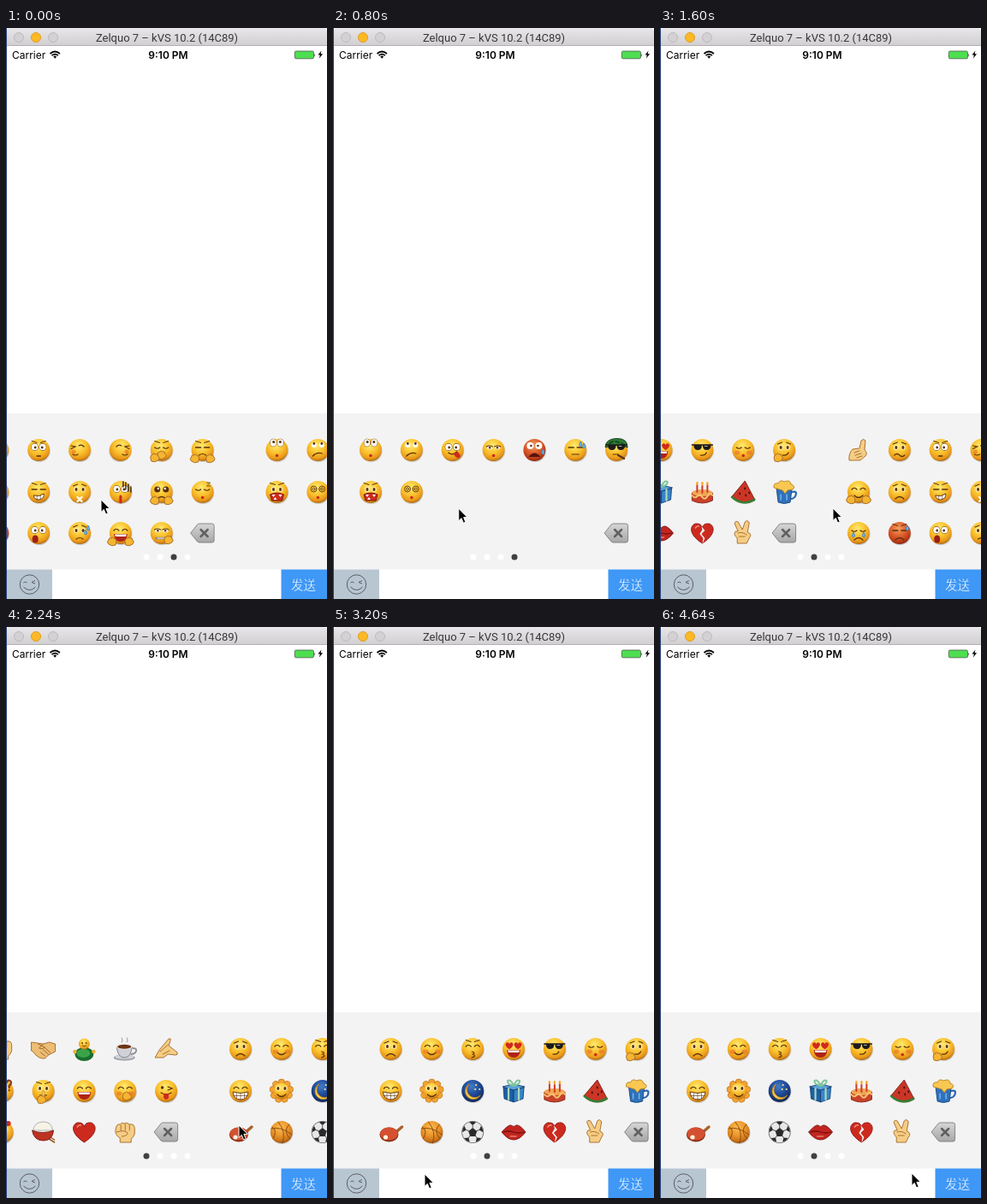
These frames come from a looping animation (375 by 667 pixels, 4720 ms). An HTML page:

```html
<!DOCTYPE html>
<html lang="zh">
<meta charset="utf-8">
<title>Emoji keyboard</title>
<style>
  html, body { margin: 0; width: 100%; height: 100%; overflow: hidden; background: #fff; }
  svg { display: block; width: 375px; height: 667px; }
  text { font-family: Inter, Roboto, sans-serif; font-size: 12px; }
</style>
<svg viewBox="0 0 375 667">
  <defs>
    <linearGradient id="chrome" x2="0" y2="1"><stop stop-color="#e8e6e8"/><stop offset="1" stop-color="#d0ced0"/></linearGradient>
    <linearGradient id="key" x2="0" y2="1"><stop stop-color="#d6d6d6"/><stop offset="1" stop-color="#a6a6a6"/></linearGradient>
    <clipPath id="panel"><path d="M1 450h374v182H1z"/></clipPath>
  </defs>
  <path d="M0 0h375v667H0z" fill="#fff"/>
  <path d="M0 0h1v667H0z" fill="#25417f"/>
  <path d="M1 21V4q0-4 4-4h366q4 0 4 4v17z" fill="url(#chrome)"/>
  <path d="M1 20.5h374" stroke="#b3b1b3"/>
  <g stroke="#bcbabc" fill="#d3d1d3">
    <circle cx="15" cy="11" r="5.5"/><circle cx="55" cy="11" r="5.5"/>
    <circle cx="35" cy="11" r="5.5" fill="#fdb924" stroke="#df9d1d"/>
  </g>
  <text x="188" y="15.5" text-anchor="middle" fill="#383838" style="font:13px Roboto,sans-serif">Zelquo 7 – kVS 10.2 (14C89)</text>
  <text x="7" y="35.5">Carrier</text>
  <g fill="none" stroke="#000" stroke-width="1.7">
    <path d="M51.5 30q5.7-5 11.4 0M53.5 32.2q3.7-3.2 7.4 0"/>
    <path d="M55.2 33.3q2-1.6 4 0l-2 2.4z" fill="#000" stroke="none"/>
  </g>
  <text x="189.5" y="35.5" text-anchor="middle" font-weight="600">9:10 PM</text>
  <rect x="337.3" y="27" width="22.2" height="8.8" rx="1.6" fill="#4ede51" stroke="#4a5a4a" stroke-width=".8"/>
  <path d="M360.5 30q1.5 1.7 0 3.5zM368.5 26.5l-4 5h2.4l-1 4 4.2-5.2h-2.5z"/>
  <path d="M1 450h374v182.5H1z" fill="#f3f3f3"/>
  <g clip-path="url(#panel)"><g id="strip"></g></g>
  <g id="dots"></g>
  <path d="M1 632.5h53v34.5H1z" fill="#b8c6d2"/>
  <g fill="none" stroke="#55585c" stroke-width=".95">
    <circle cx="27.5" cy="650" r="11.2"/>
    <path d="M20.5 648q2-2 4 0M34 645.5l-4 2 4 1.6M20.5 653q7 7 14 0"/>
  </g>
  <path d="M321.5 632.5h53.5v34.5h-53.5z" fill="#3f98f6"/>
  <text x="347.5" y="656.3" text-anchor="middle" fill="#fff" stroke="#3f98f6" stroke-width=".35" style="font:300 14.5px 'Noto Sans CJK SC','Noto Sans CJK',sans-serif">发送</text>
  <path id="cursor" d="M0 0V14.5L3.3 11.4L5.6 17L8.2 15.9L5.9 10.4H10.3Z" stroke="#fff" stroke-width="1"/>
</svg>
<script>
const LOOP = 4720, STEP = 80, PAGE = 374;
const ink = '#5a300a', white = '#fff', red = '#cf2a1c', skin = '#f6cd84', edge = '#a1672a', blue = '#6fb4e6';
const $ = id => document.getElementById(id);

// drawing helpers, centred on 0,0
const line = (d, w = 1.2, c = ink) => `<path d="${d}" fill="none" stroke="${c}" stroke-width="${w}" stroke-linecap="round"/>`;
const shape = (d, c, s = 'none') => `<path d="${d}" fill="${c}" stroke="${s}" stroke-width=".9" stroke-linejoin="round"/>`;
const dot = (x, y, r, c = ink, ry = r) => `<ellipse cx="${x}" cy="${y}" rx="${r}" ry="${ry}" fill="${c}"/>`;
const both = s => s + `<g transform="scale(-1 1)">${s}</g>`;
const place = (x, y, s, extra = '') => `<g transform="translate(${x} ${y}) ${extra}">${s}</g>`;
const spin = (n, s) => Array.from({ length: n }, (_, i) => `<g transform="rotate(${i * 360 / n})">${s}</g>`).join('');

const shade = (id, ...colors) => document.querySelector('defs').insertAdjacentHTML('beforeend',
  `<radialGradient id="${id}" cx=".45" cy=".3" r=".72">${colors.map((c, i) =>
    `<stop offset="${[.05, .5, .82, 1][i]}" stop-color="${c}"/>`).join('')}</radialGradient>`);
shade('yellow', '#ffe66a', '#f9c02c', '#e7961a', '#a8640e');
shade('angry', '#f09a5a', '#dc5c2b', '#b83a18', '#842510');
shade('orange', '#fbb84e', '#ea962b', '#cc7318', '#8e4d0c');
shade('night', '#3f78c4', '#204a98', '#15346e', '#0d2450');

const ball = (id, r = 13) => dot(.7, 1.2, r, '#0002') + dot(0, 0, r, `url(#${id})`);
const face = (...parts) => ball('yellow') + parts.join('');
const rage = (...parts) => ball('angry') + parts.join('');

const eyes = {
  dots: both(dot(4.2, -3, 2.6, '#fff9', 3) + dot(4, -3, 1.5, ink, 1.9)),
  happy: both(line('M2-3q3-3.5 6 0')),
  shut: both(line('M2-3q3 2.5 6 0')),
  flat: both(line('M2-3h6', 1.5)),
  wide: both(dot(4.7, -3.5, 4.4, '#8a5212') + dot(4.7, -3.5, 3.8, white) + dot(4, -3, 1.4)),
  up: both(dot(4.2, -8.5, 4.1, '#8a5212', 4.8) + dot(4.2, -8.5, 3.5, white, 4.2) + dot(3.8, -9.6, 1.5)),
  half: both(dot(4.6, -3, 3.2, white, 2) + dot(4.4, -2.7, 1.3) + line('M1.2-4q3.5-2 7 0')),
  dizzy: both(line('M4.8-3.5m-3.5 0a3.5 3.5 0 1 0 7 0a3.5 3.5 0 1 0-7 0M3.3-3.5a1.5 1.5 0 1 0 3 0a1.5 1.5 0 1 0-3 0', .9)),
  tilted: line('M-10-5l5 1-5 2.5M-1-5q3-2 6 1'),
};
const smile = line('M-5 4q5 5 10 0'), frown = line('M-5 8q5-5 10 0');
const smirk = line('M-2 6q5 1 7-3'), pout = dot(0, 6.5, 1.8, red);
const laugh = shape('M-8 1h16q-1 9-8 9t-8-9z', '#b02318') + shape('M-7 1.4h14l-1 2.6h-12z', white);
const teeth = shape('M-9 1q9 3 18 0q-1 9-9 9t-9-9z', white, ink) + line('M-4.5 3v5.5M0 3v7M4.5 3v5.5M-8 5.5h16', .6);
const grin = shape('M-6 4q7 2 12-2q1 6-6 7-5 0-6-5z', white, ink) + line('M-2 5v4M2 4v4', .6);
const gasp = dot(0, 6, 3, '#9c1d16', 4);
const brows = both(line('M2-8.5l6-2', 1)), worry = both(line('M2.5-9l5 2', 1.1));
const cheeks = both(dot(7, 3, 3.2, '#e8642b88', 2.4));
const tear = (x, y) => shape(`M${x} ${y}q-3 5 0 6q3-1 0-6z`, blue, '#3f86c4');
const paw = (x, y) => place(x, y, shape('M-5 0q0-4 3-4q1-2 3 0q3-1 3 2q3 2 0 5q-4 3-8 1z', '#f5b531', edge));
const shades = both(shape('M.5-6h9.5q0 6-4.8 6T.5-6z', '#1b1b1b')) + line('M-12-6h24', 1.5, '#1b1b1b') + line('M3-4.5l3 0', 1, '#aaa');
const sulk = face(eyes.tilted, dot(-7, 2, 2.5, '#e8642b88'), line('M-8 5q3 2 6 0'));

// objects
const heartPath = 'M0 12C-20-1-12-12-6-11Q-1-11 0-6Q1-11 6-11C12-12 20-1 0 12z';
const heart = shape(heartPath, '#cd2a1f', '#8a1712') + line('M-8-6q2-3 4-2', 1.6, '#f0907f');
const broken = heart + shape('M-1-8l4 5-4 4 4 5-3 7 1-7-4-5 3-5z', '#f3f3f3');
const fist = shape('M-11-4q1-6 5-5q2-3 5-1q3-2 6 1q6-1 6 5v6q-2 5-4 6v4h-13v-5q-7-4-5-11z', skin, edge)
  + line('M-5-8v6M0-9v7M5-8v6M-10 0q9-3 13 1q-1 4-7 4', .9, edge);
const victory = shape('M-7 12v-6q-5-5-2-8l3 0-4-9q0-4 4-2l5 9 3-9q3-3 5 1l-2 11q6 2 2 7l-3 6z', skin, edge) + line('M-6 0q5-2 10 2M-5 4h7', .9, edge);
const point = shape('M-11 12q-1-8 4-13l8-1 2-9q3-3 5 0l-1 11q4 3 1 7l-6 5z', skin, edge) + line('M-5 3l6-2M-4 6l7-2M-2 9l6-2', .9, edge);
const clap = shape('M-13 10l5-9 11-13q3-1 2 2l-2 6 10 8q1 3-2 3l-9-1-5 4z', skin, edge) + line('M-7 3l9-8M-4 6l8-4', .9, edge);
const shake = shape('M-14-8l7 1 7 1 7-2 7 2v9l-8 4-4 4q-8 1-14-8l-2-1z', '#ecbe74', edge)
  + line('M-6-6l6 3 8 7M-3 4l5 4M0 1l6 5M0-6l-5 5q4 2 7-1', 1, edge);
const baby = dot(0, 6, 11, '#1a6e2e', 8) + dot(-1, 5, 8, '#3aa348', 5) + dot(0, -6, 6.5, 'url(#yellow)')
  + both(dot(2.3, -7, .9)) + line('M-2-4q2 2 4 0', .9) + both(dot(11, 3, 2.2, '#f2b232'));
const coffee = dot(-1, 10, 12.5, '#9da0a6', 3.5) + dot(-1, 9.2, 11, '#d0d2d6', 2.6) + shape('M-10-3q1 13 9 13t9-13z', '#cfd1d6', '#777a80')
  + line('M9-1q6 0 3 5q-2 2-5 2', 1.8, '#8d8f94') + dot(-1, -3, 9.5, '#eee', 3.4) + dot(-1, -2.7, 8, '#6d3514', 2.5) + line('M-4-8q2-2 0-5M2-8q2-2 0-5', 1, '#999');
const rice = line('M2 5l11 7M4 3l9 6', 1.5, '#9a5724') + shape('M-12-2q2-10 12-10t11 10z', '#f6f2e6', '#aaa')
  + shape('M-13-2q12 5 25 0q-1 12-12 12t-13-12z', '#bd3322', '#7c1c13');
const sun = spin(9, dot(0, -10, 4, '#c87a1c', 4.2) + dot(0, -10, 3.2, '#f0a334', 3.6)) + dot(0, 0, 9.5, 'url(#yellow)') + eyes.dots + smile;
const moon = ball('night') + shape('M-4-8A9.5 9.5 0 1 0 9 5A9 9 0 0 1-4-8z', '#f7cb4c', '#b9801c') + [[4, -7], [8, -2], [3, -2]].map(([x, y]) => dot(x, y, 1.1, '#ffe98a')).join('');
const gift = shape('M-12-4L0-1V13L-11 9z', '#1c5fa8', '#153f75') + shape('M0-1L12-4L11 9L0 13z', '#3784c8', '#153f75')
  + shape('M-13-5L0-8L13-5L0-1z', '#5aa2dc', '#153f75') + line('M-6-3V10M6-3V10', 2.2, '#a9d9b8')
  + both(line('M0-6q3-8 7-6q1 4-7 6', 2, '#7fc59a'));
const cake = shape('M-12 1v9q12 6 24 0V1z', '#c9412a', '#83240f') + dot(0, 1, 12, '#f0a652', 4) + line('M-12 4q3 4 6 1t6 1 6-1 6-1', 2, '#f8c474')
  + line('M-6 0v-8M0 1v-8M6 0v-8', 2, '#d03a2b') + [-6, 0, 6].map(x => dot(x, -10, 1.3, '#f9a51f', 2)).join('');
const melon = shape('M2-13L-13 5q12 12 26 3z', '#cb3526', '#7c1c13') + line('M-13 6q12 11 26 3', 2.8, '#3b7c35')
  + [[-4, 2], [2, -4], [3, 4], [7, 1]].map(([x, y]) => dot(x, y, .9, '#35120c', 1.4)).join('');
const beer = line('M9 0q7-2 4 5q-2 3-5 3', 2.2, '#2b67b4') + shape('M-9-4h18l-2 16q-7 3-14 0z', '#2f72bc', '#194780')
  + shape('M-12-5q-1-6 5-5q2-5 7-2q7-3 8 3q6 2 2 6l-6 1-3 4-3-4z', '#f8c852', '#b9821f') + line('M-4 3v6M3 3v6', 1.4, '#7db9ee');
const paddle = line('M5 1L13-6', 3.5, '#a7622c') + dot(-2, 3, 11, '#8c2e14', 8.5) + dot(-2, 2, 10.5, '#d45030', 7.5) + dot(-6, 6, 2.6, '#fff4dc');
const basket = ball('orange') + line('M-12-4Q0-7 12 3M-4-12Q6 0 1 13M-10 8Q-4-2-11-6M9-9Q1-1 10 8', .9, '#84450f');
const soccer = dot(0, 0, 13, '#666') + dot(0, 0, 12.2, '#e8e8e8') + shape('M0-5L5-1L3 5H-3L-5-1z', '#2a2a2a')
  + spin(5, shape('M-4-11.5q4-1.5 8 0L0-8z', '#2a2a2a') + line('M0-5v-3', 1, '#555'));
const lips = shape('M-14 0Q-6-9-3-8Q0-5 3-8Q7-9 14 0Q7 9 0 9T-14 0z', '#c2251f', '#7c1512') + line('M-12 0q6-2 12 0t12 0', 1.3, '#701010') + line('M-4 5h7', 1.4, '#e87a70');
const del = shape('M-14 0L-6-10Q-5-11-3-11H11q2.5 0 2.5 2.5V8.5q0 2.5-2.5 2.5H-3Q-5 11-6 10z', 'url(#key)', '#7d7d7d') + line('M-2-4l8 8M6-4l-8 8', 2.5, '#606060');
const helmet = shape('M-13-3Q-13-13 0-13.5T13-3Q0-8-13-3z', '#2f7a35', '#143f1a') + line('M-8-8l4-2M-1-10l4 1M6-8l3 2', 2, '#164b1e');
const question = place(8, -6, line('M-3-4q2-4 5-1q1 3-2 5v2M0 5v.3', 2.3, '#8d3a12'));

const pages = [
  [[face(eyes.happy, smile), fist, fist, shake, baby, coffee, clap],
   [face(eyes.dots, smile), face(eyes.wide, frown), face(eyes.dots, frown, question),
    face(eyes.dots, brows, line('M-4 5h8'), line('M0 1v10', 3.2, edge), line('M0 1v10', 2.2, '#fbd45c'), paw(-2, 10)),
    face(eyes.happy, laugh), face(eyes.happy, paw(2, 6), cheeks),
    face(dot(-4.5, -4, 1.7), line('M2-5l5 2-5 2'), line('M-6 2q6 4 12 0'), shape('M-3 3h6v5q-3 4-6 0z', red))],
   [heart, face(eyes.happy, cheeks, smile), face(eyes.dots, gasp, both(dot(7, -10, 3, red))), rice, heart, fist, del]],
  [[face(eyes.dots, worry, frown), face(eyes.happy, smile, cheeks), face(eyes.happy, brows, line('M-1 3q5 1 1 3q5 2-1 4')),
    face(both(place(5, -4, shape(heartPath, red), 'scale(.35)')), laugh), face(shades, smirk),
    face(eyes.shut, cheeks, pout), face(eyes.dots, worry, smirk, paw(-7, 9))],
   [face(eyes.happy, teeth), sun, moon, gift, cake, melon, beer],
   [paddle, basket, soccer, lips, broken, victory, del]],
  [[point, face(eyes.dots, worry, line('M-6 6q3-3 6 0t6 0')), face(eyes.wide, brows, line('M-2 7h4', 1.6)),
    sulk, place(0, 0, sulk, 'scale(-1 1)'),
    face(eyes.shut, brows, paw(0, 6), paw(-8, 9)), face(eyes.flat, brows, line('M-4 6q4-3 8 0'), both(paw(9, 10)))],
   [face(eyes.happy, smile, both(paw(9, 9))), face(eyes.dots, worry, frown), face(eyes.flat, brows, grin),
    face(eyes.dots, worry, line('M-2.5 6l5 5M2.5 6l-5 5', 2.3, white)),
    face(eyes.wide, line('M3-12v6M6-11v8M9-9v8M12-6v6', 1.5, '#3c3020'), line('M0 5v7', 3, red)),
    face(both(dot(5, -3, 3.5) + dot(4, -4, 1.2, white)), frown, both(paw(8, 10))),
    face(eyes.shut, pout, line('M5-11h4l-4 4h4', 1, '#7a5a1c'))],
   [face(eyes.shut, frown, both(tear(6, -1))), rage(eyes.flat, brows, frown, tear(9, -9)),
    face(eyes.wide, dot(-4, 7, 3.5, '#9c1d16', 4.5)), face(eyes.dots, worry, line('M-4 7q4-3 8 0'), tear(10, -9), tear(7, -4)),
    face(eyes.happy, laugh, both(paw(10, 10))), face(eyes.half, line('M-6 6h11', 2.4, '#777'), line('M-5 6h9', 1, white), paw(8, 8)), del]],
  [[face(eyes.up, pout), face(both(dot(4.5, -6, 3, white) + dot(4.5, -7.5, 1.4)), line('M-6 7q5-5 11-3')),
    face(eyes.wide, line('M-5 3q5 4 10-1'), shape('M1 4l5-2q5 5 2 7q-5 1-7-5z', red)), face(eyes.half, pout),
    rage(both(dot(5, -5, 4, white) + dot(4, -5, 1.3)), shape('M-7 8q7-9 14 0z', '#59140d'), tear(10, -1)),
    face(eyes.flat, line('M-4 5h8'), tear(10, -8), tear(6, -10)),
    face(helmet, shades, line('M-4 5h6'), line('M2 6l7 4', 2.2, '#5f3418'))],
   [face(eyes.dots, brows, shape('M-8 3q8-4 16 0l-2 7h-12z', red, '#6f120e'), shape('M-6 3l2 3 2-3zM2 3l2 3 2-3zM-4 9l2-3 2 3z', white)),
    face(eyes.dizzy, pout)],
   [, , , , , , del]],
];

$('strip').innerHTML = pages.map((rows, p) => rows.map((row, r) => row.map((icon, c) =>
  place(44 + p * PAGE + c * 47.85, [493, 542, 590][r], icon)).join('')).join('')).join('');
$('dots').innerHTML = pages.map((_, i) => dot(164 + i * 16, 618, 3.5)).join('');

// keys: [time, value(s)..., easing into the key]
const linear = p => p, speedUp = p => p * p, slowDown = p => 1 - (1 - p) ** 3, smooth = p => p * p * (3 - 2 * p);
const scrollKeys = [
  [0, 849.5], [320, 1122, slowDown], [1110, 1122], [1200, 1082, speedUp], [1440, 770, linear], [1600, 560, linear],
  [1920, 374, slowDown], [2060, 374], [2240, 144, speedUp], [2520, 0, slowDown], [2900, 0], [3040, 186, speedUp], [3360, 374, slowDown],
];
const cursorKeys = [
  [0, 111, 551], [320, 198, 555], [1080, 124, 564], [1200, 162, 563, linear], [1320, 270, 562], [1480, 142, 564],
  [1600, 202, 561, linear], [1720, 275, 565], [2000, 140, 572], [2240, 272, 582], [2840, 296, 606], [3080, 118, 634],
  [3200, 107, 639], [4000, 294, 638],
];
function at(keys, t, field) {
  const i = keys.findIndex(k => k[0] > t);
  if (i < 0) return keys.at(-1)[field];
  const a = keys[i - 1], b = keys[i], last = b.at(-1);
  const ease = typeof last === 'function' ? last : smooth;
  return a[field] + (b[field] - a[field]) * ease((t - a[0]) / (b[0] - a[0]));
}

function draw() {
  const t = Math.floor(performance.now() % LOOP / STEP) * STEP;
  const scroll = at(scrollKeys, t, 1), current = Math.round(scroll / PAGE);
  $('strip').setAttribute('transform', `translate(${-scroll} 0)`);
  $('cursor').setAttribute('transform', `translate(${at(cursorKeys, t, 1)} ${at(cursorKeys, t, 2)})`);
  [...$('dots').children].forEach((d, i) => d.setAttribute('fill', i === current ? '#404040' : white));
  requestAnimationFrame(draw);
}
draw();
</script>
</html>
```
